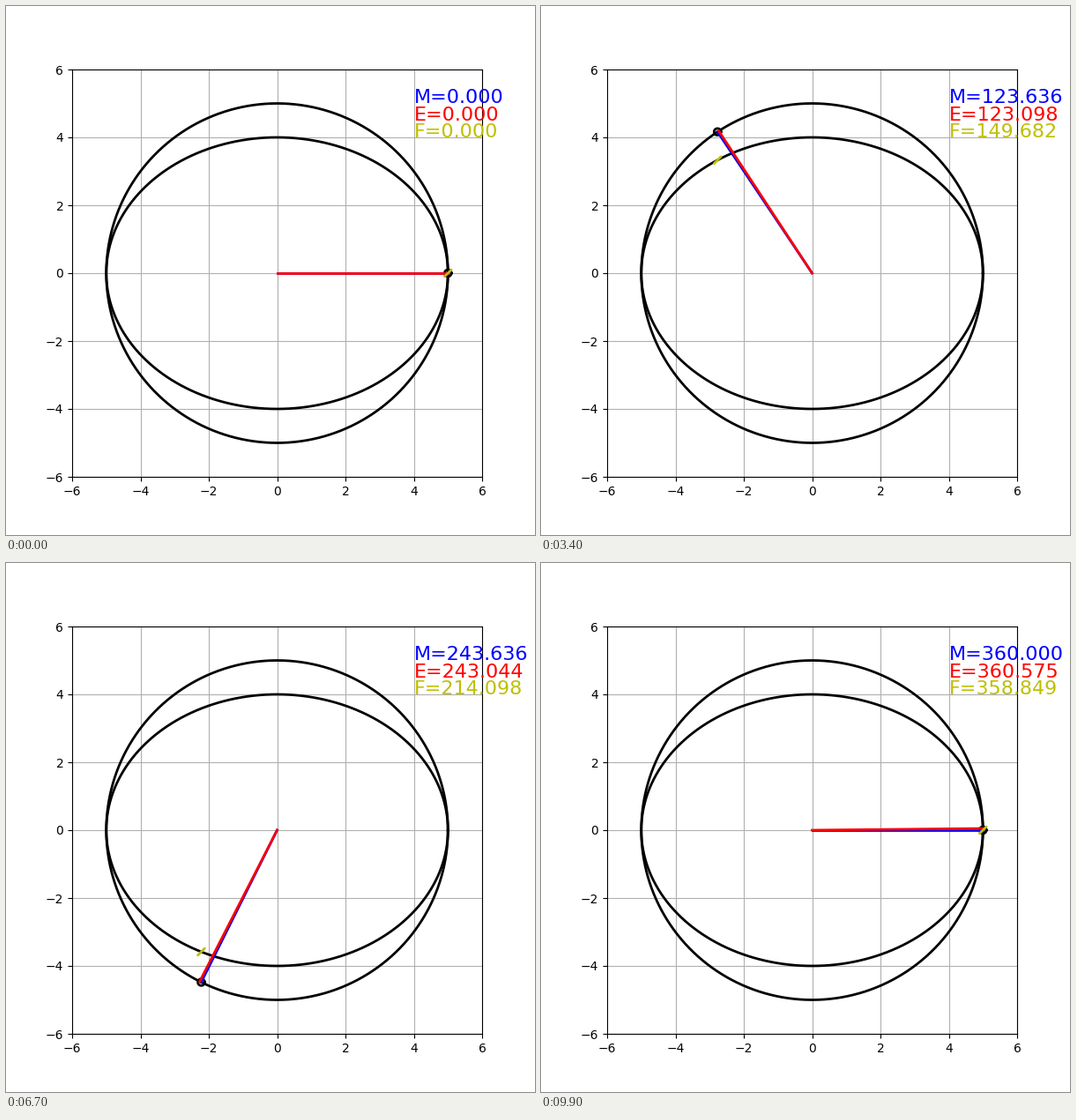
Write a matplotlib script that moves like this. It is 600 px wide and 600 px high and loops after 10000 ms.

```python
import numpy as np
import matplotlib.pyplot as plt
from matplotlib.animation import FuncAnimation

FRAMES = 100
A, B = 5, 4
ECC = np.sqrt(A**2 - B**2) / A
DOT = 0.1

turn = np.linspace(0, 2 * np.pi, 361)


def oval(cx, cy, rx, ry):
    return cx + rx * np.cos(turn), cy + ry * np.sin(turn)


def anomalies(i):
    """Mean, eccentric and true anomaly in degrees."""
    m = 360 * i / (FRAMES - 1)
    e = m + ECC * np.sin(m)  # one step, sine taken of the raw number
    c = np.cos(np.radians(e))
    ratio = np.clip((c - ECC) / (1 - ECC * c), -1, 1)
    f = np.degrees(np.arccos(ratio))
    return m, e, 360 - f if m > 180 else f


def tip(deg, rx, ry):
    a = np.radians(deg)
    return rx * np.cos(a), ry * np.sin(a)


fig, ax = plt.subplots(figsize=(6, 6), dpi=100)
ax.set_xlim(-6, 6)
ax.set_ylim(-6, 6)
ax.grid(True)

ax.plot(*oval(0, 0, A, A), "k", lw=2)
ax.plot(*oval(0, 0, A, B), "k", lw=2)
ring, = ax.plot([], [], "k", lw=2)
mean_arm, = ax.plot([], [], "b", lw=2)
ecc_arm, = ax.plot([], [], "r", lw=2)
tick, = ax.plot([], [], "y", lw=2, solid_capstyle="round")
labels = [ax.text(4, y, "", color=c, fontsize=16)
          for y, c in ((5, "b"), (4.5, "r"), (4, "y"))]


def update(i):
    values = anomalies(i)
    m, e, _ = values
    x, y = tip(m, A, A)
    ex, ey = tip(e, A, A)
    ring.set_data(*oval(x, y, DOT, DOT))
    mean_arm.set_data([0, x], [0, y])
    ecc_arm.set_data([0, ex], [0, ey])
    px, py = tip(m, A, B)
    tick.set_data([px - DOT, px + DOT], [py - DOT, py + DOT])
    for label, name, value in zip(labels, "MEF", values):
        label.set_text(f"{name}={value:.3f}")
    return [ring, mean_arm, ecc_arm, tick, *labels]


anim = FuncAnimation(fig, update, frames=FRAMES, interval=100,
                     repeat=True, repeat_delay=0)
plt.show()
```
